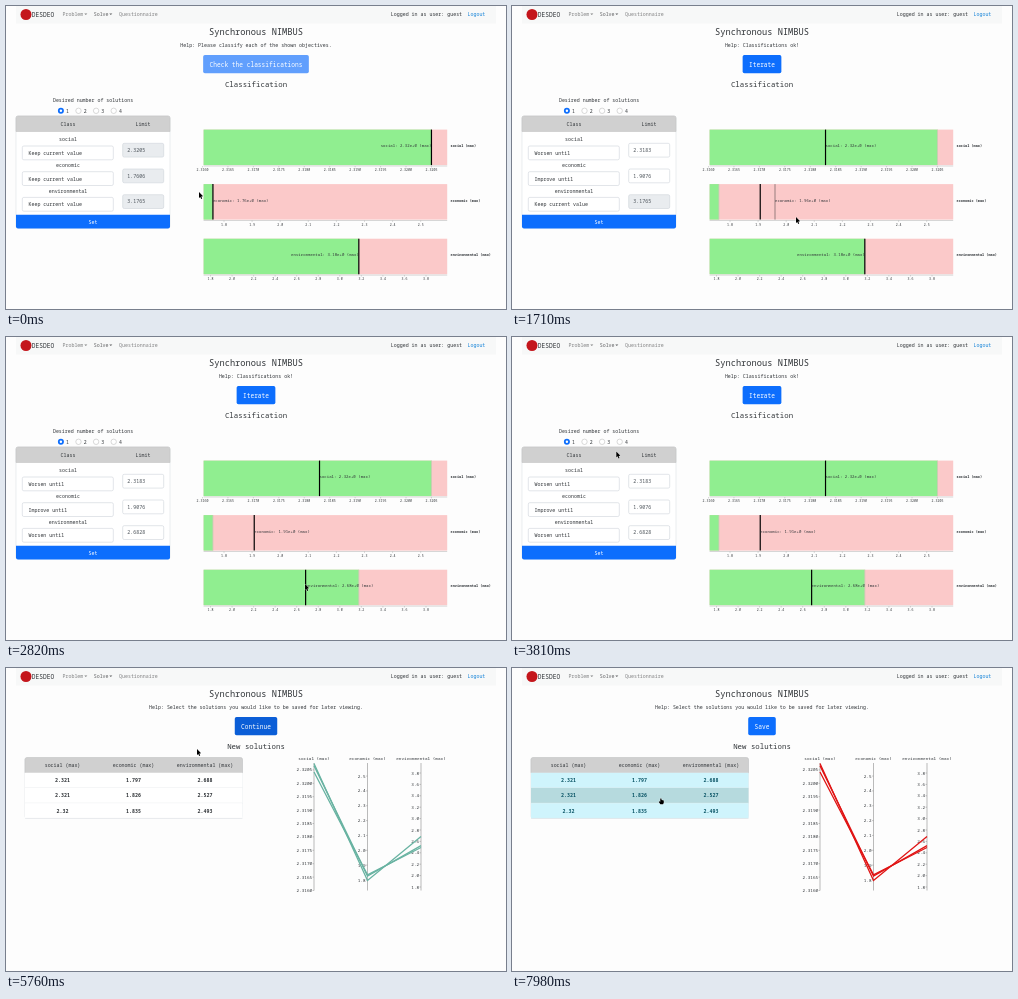
These frames come from a looping animation (500x303 px, 8 s). An HTML page with a canvas:

```html
<!DOCTYPE html>
<html lang="en">
<head>
<meta charset="utf-8">
<title>Synchronous NIMBUS</title>
<style>
  html, body { margin: 0; width: 100%; height: 100%; overflow: hidden; background: #fdfdfd; }
  canvas { display: block; width: 500px; height: 303px; }
</style>
</head>
<body>
<canvas></canvas>
<script>
const LOOP = 8000, PAGE_CHANGE = 5200, RADIO_CLICK = 4000, READY = 1400;
const BLUE = '#0d6efd', INK = '#303438', GRID = '#dee2e6';
const canvas = document.querySelector('canvas');
const ctx = canvas.getContext('2d');
const ratio = window.devicePixelRatio || 1;
canvas.width = 500 * ratio;
canvas.height = 303 * ratio;

const charts = [
  { name: 'social', top: 123.6, origin: 196.5, first: 2.316, step: 0.0005, gap: 25.44, count: 10, digits: 4,
    current: 2.3205, chosen: 2.3183, at: 780, verb: 'Worsen until' },
  { name: 'economic', top: 178.1, origin: 218, first: 1.8, step: 0.1, gap: 28.1, count: 8, digits: 1,
    current: 1.7606, chosen: 1.9076, at: READY, verb: 'Improve until' },
  { name: 'environmental', top: 232.7, origin: 204.5, first: 1.8, step: 0.2, gap: 21.55, count: 11, digits: 1,
    current: 3.1765, chosen: 2.6828, at: 2600, verb: 'Worsen until' }
];
const BAR = { left: 197.6, right: 441.2, height: 35.5 };

const axes = [
  { name: 'social', x: 308, y: 222.5, first: 2.316, step: 0.0005, gap: 13.4, count: 10, digits: 4 },
  { name: 'economic', x: 361.5, y: 212, first: 1.8, step: 0.1, gap: 14.85, count: 8, digits: 1 },
  { name: 'environmental', x: 415, y: 219, first: 1.8, step: 0.2, gap: 11.4, count: 11, digits: 1 }
];
const solutions = [
  { cells: ['2.321', '1.797', '2.688'], start: 2.32074, at: 6280 },
  { cells: ['2.321', '1.826', '2.527'], start: 2.32066, at: 7650 },
  { cells: ['2.32', '1.835', '2.493'], start: 2.32042, at: 6800 }
];

// Pointer path: time, x, y
const path = [
  [0, 193, 186], [30, 193, 186], [450, 290, 155], [700, 313, 142], [840, 313, 142],
  [1150, 265, 180], [1380, 248, 195], [1590, 248, 195], [1710, 284, 211], [2000, 296, 235],
  [2370, 299, 247], [3240, 299, 247], [3450, 240, 205], [3800, 105, 115], [4020, 90, 103],
  [4230, 90, 103], [4650, 215, 65], [4830, 235.5, 57], [5010, 238, 57], [5400, 238, 57],
  [5580, 225, 65], [5760, 191, 81], [5850, 178, 87], [6150, 140, 111], [6350, 140, 112],
  [6630, 144, 140], [6950, 145, 141], [7250, 148, 131], [8000, 149, 130]
];

const ramp = (t, from, to) => Math.min(1, Math.max(0, (t - from) / (to - from)));

function pointerAt(t) {
  const i = Math.max(1, path.findIndex(p => p[0] >= t));
  const [a, b] = [path[i - 1], path[i]];
  const k = ramp(t, a[0], b[0]);
  return { x: a[1] + (b[1] - a[1]) * k, y: a[2] + (b[2] - a[2]) * k };
}

// y is the middle of the capitals; the large font keeps letter spacing even at tiny sizes
function text(str, x, y, { size = 4.95, color = INK, align = 'left', bold = false } = {}) {
  ctx.save();
  ctx.translate(x, y + size * 0.35);
  ctx.scale(0.1, 0.1);
  ctx.font = `${bold ? 600 : 400} ${size * 10}px "Noto Sans Mono", "DejaVu Sans Mono", monospace`;
  ctx.textAlign = align;
  ctx.fillStyle = color;
  ctx.fillText(str, 0, 0);
  ctx.restore();
}
const centered = (str, x, y, options) => text(str, x, y, { align: 'center', ...options });

function rect(x, y, w, h, color) {
  ctx.fillStyle = color;
  ctx.fillRect(x, y, w, h);
}
function box(x, y, w, h, radius, fill, stroke) {
  ctx.beginPath();
  ctx.roundRect(x, y, w, h, radius);
  if (fill) { ctx.fillStyle = fill; ctx.fill(); }
  if (stroke) { ctx.strokeStyle = stroke; ctx.lineWidth = 0.6; ctx.stroke(); }
}
function circle(x, y, r, fill, stroke) {
  ctx.beginPath();
  ctx.arc(x, y, r, 0, Math.PI * 2);
  if (fill) { ctx.fillStyle = fill; ctx.fill(); }
  if (stroke) { ctx.strokeStyle = stroke; ctx.lineWidth = 0.6; ctx.stroke(); }
}
function polyline(points, color, width) {
  ctx.beginPath();
  points.forEach(([x, y]) => ctx.lineTo(x, y));
  ctx.strokeStyle = color;
  ctx.lineWidth = width;
  ctx.stroke();
}
function caret(x, y, color) {
  ctx.beginPath();
  ctx.moveTo(x - 1.5, y - 0.8);
  ctx.lineTo(x + 1.5, y - 0.8);
  ctx.lineTo(x, y + 0.8);
  ctx.fillStyle = color;
  ctx.fill();
}

function drawHeader(t) {
  rect(10, 0, 480, 17.5, '#f7f8f8');
  circle(20, 8.5, 5.5, '#c4161c');
  text('DESDEO', 25.8, 8.7, { size: 6.2 });
  text('Problem', 56.5, 8.7, { color: '#808182' });
  caret(79.8, 8.2, '#808182');
  text('Solve', 87.7, 8.7, { color: '#606163' });
  caret(104.8, 8.2, '#606163');
  text('Questionnaire', 113, 8.7, { color: '#808182' });
  text('Logged in as user: guest', 384.8, 8.7);
  text('Logout', 461.5, 8.7, { color: '#1583d8' });

  const saved = t >= solutions[0].at, ready = t >= READY, results = t >= PAGE_CHANGE;
  const help = results ? 'Select the solutions you would like to be saved for later viewing.'
    : ready ? 'Classifications ok!' : 'Please classify each of the shown objectives.';
  const label = results ? (saved ? 'Save' : 'Continue') : ready ? 'Iterate' : 'Check the classifications';
  const hover = ramp(t, 4830, 4980) - ramp(t, 5760, 5910);
  const blue = `rgb(${13 - 2 * hover}, ${110 - 16 * hover}, ${253 - 38 * hover})`;
  const width = label.length * 3.72 + 12.7;

  centered('Synchronous NIMBUS', 250, 25.5, { size: 8.7 });
  centered('Help: ' + help, 250, 39);
  box(250 - width / 2, 48.9, width, 18.3, 1.8, ready ? blue : '#619ffd');
  centered(label, 250, 58.5, { size: 6.2, color: '#fff' });
  centered(results ? 'New solutions' : 'Classification', 250, 78.5, { size: 7.4 });
}

function drawForm(t) {
  centered('Desired number of solutions', 87, 93.8);
  const selected = t >= RADIO_CLICK ? 3 : 1;
  for (let n = 1; n <= 4; n++) {
    const x = 37.3 + n * 17.6;
    if (n === selected) {
      if (n === 3) circle(x, 104.8, 4.4, '#c2dbfe');
      circle(x, 104.8, 3, BLUE);
      circle(x, 104.8, 1.2, '#fff');
    } else {
      circle(x, 104.8, 2.7, '#fff', '#bfbfbf');
    }
    centered(String(n), x + 6.7, 105);
  }

  box(10, 110, 154, 112, 2, '#fff', GRID);
  box(10, 110, 154, 15.5, [2, 2, 0, 0], '#d0d0d0', '#c4c4c4');
  centered('Class', 62, 118);
  centered('Limit', 137, 118);
  charts.forEach((chart, i) => {
    const y = i * 25.7, changed = t >= chart.at;
    centered(chart.name, 62, 133.7 + y);
    box(16.3, 140 + y, 91, 13.8, 1.5, '#fff', '#ced4da');
    text(changed ? chart.verb : 'Keep current value', 22.5, 147.2 + y);
    box(116.7, 137.3 + y, 41, 13.8, 1.5, changed ? '#fff' : '#e9ecef', '#ced4da');
    text((changed ? chart.chosen : chart.current).toFixed(4), 121.3, 144.3 + y, { color: '#495057' });
  });
  box(10, 208.8, 154, 13.7, [0, 0, 2, 2], BLUE);
  centered('Set', 87, 215.8, { color: '#fff' });
}

function drawChart(chart, t) {
  const { left, right, height } = BAR, { top } = chart, bottom = top + height;
  const axisY = bottom + 0.9;
  const toX = value => chart.origin + (value - chart.first) / chart.step * chart.gap;
  const currentX = toX(chart.current);
  rect(left, top, right - left, height, '#fbc9c9');
  rect(left, top, currentX - left, height, '#90ee90');
  polyline([[currentX, top], [currentX, bottom]], '#c9c9b4', 0.8);

  polyline([[left, axisY], [right, axisY]], '#9a9a9a', 0.4);
  for (let i = 0; i < chart.count; i++) {
    const x = chart.origin + i * chart.gap;
    polyline([[x, axisY], [x, axisY + 1.4]], '#9a9a9a', 0.4);
    centered((chart.first + i * chart.step).toFixed(chart.digits), x, bottom + 4.9, { size: 3.3 });
  }

  const value = t >= chart.at ? chart.chosen : chart.current;
  const x = toX(value);
  polyline([[x, top], [x, bottom]], '#000', 1.2);

  // The hover marker trails the pointer slightly and hides once it leaves the bar
  const p = pointerAt(Math.max(0, t - 70));
  const resting = Math.abs(p.x - x) < 1;
  const hovering = !resting && p.x > left && p.x < right && p.y > top && p.y < bottom;
  const markX = hovering ? p.x : x;
  const markValue = hovering ? chart.first + (p.x - chart.origin) / chart.gap * chart.step : value;
  if (hovering) polyline([[markX, top], [markX, bottom]], '#333', 0.5);
  text(`${chart.name}: ${markValue.toExponential(2)} (max)`, markX, top + 16.2,
    { size: 4.03, align: markX < (left + right) / 2 ? 'left' : 'right' });
  text(`${chart.name} (max)`, 444.5, top + 16.2, { size: 3.55, bold: true });
}

function drawTable(t, pointer) {
  const columns = [56.5, 127.5, 199], left = 19, width = 217.5, top = 89.6, rowHeight = 15.2;
  box(left, top, width, rowHeight * 4, 2, '#fff', GRID);
  box(left, top, width, rowHeight, [2, 2, 0, 0], '#d0d0d0', '#c4c4c4');
  charts.forEach((chart, i) => centered(`${chart.name} (max)`, columns[i], 97.4));
  solutions.forEach((solution, row) => {
    const y = top + (row + 1) * rowHeight;
    const over = pointer.x > left && pointer.x < left + width && pointer.y >= y && pointer.y < y + rowHeight;
    const selected = t >= solution.at;
    rect(left, y, width, rowHeight, selected ? (over ? '#b6dade' : '#cff4fc') : over ? '#e8e8ec' : '#fff');
    polyline([[left, y + rowHeight], [left + width, y + rowHeight]], GRID, 0.6);
    solution.cells.forEach((cell, i) =>
      centered(cell, columns[i], y + 7.7, { bold: true, color: selected ? '#0b5566' : INK }));
  });
}

function drawParallelPlot(t) {
  const toY = (axis, value) => axis.y - (value - axis.first) / axis.step * axis.gap;
  for (const axis of axes) {
    polyline([[axis.x, 95], [axis.x, 222.5]], '#777', 0.5);
    for (let i = 0; i < axis.count; i++) {
      const y = axis.y - i * axis.gap;
      polyline([[axis.x - 1.5, y], [axis.x, y]], '#777', 0.4);
      text((axis.first + i * axis.step).toFixed(axis.digits), axis.x - 1.8, y, { size: 4.35, align: 'right' });
    }
    centered(`${axis.name} (max)`, axis.x, 90, { size: 4.35 });
  }
  for (const { cells, start, at } of solutions) {
    const values = [start, +cells[1], +cells[2]];
    polyline(axes.map((axis, i) => [axis.x, toY(axis, values[i])]), t >= at ? '#e01414' : '#69b3a2', 1.3);
  }
}

function drawPointer({ x, y }, t) {
  const results = t >= PAGE_CHANGE;
  const overButton = t >= READY && Math.abs(x - 250) < 20 && y > 49 && y < 67;
  const overRadio = !results && Math.hypot(x - 90, y - 104.8) < 4;
  const overRow = results && x > 19 && x < 236 && y > 105 && y < 151;
  ctx.save();
  ctx.translate(x, y);
  ctx.fillStyle = '#000';
  ctx.strokeStyle = '#fff';
  ctx.lineWidth = 0.5;
  const outline = overButton || overRadio || overRow
    ? [[-0.7, 0.4], [0.4, 0.4], [0.7, 2], [2.8, 2.5], [2.8, 4.8], [2.1, 6.2], [-0.6, 6.2], [-2.2, 4], [-1.7, 3.3], [-0.7, 3.8]]
    : [[0, 0], [0, 6], [1.3, 4.9], [2.2, 7], [3.2, 6.5], [2.3, 4.5], [4.1, 4.3]];
  ctx.beginPath();
  outline.forEach(point => ctx.lineTo(...point));
  ctx.closePath();
  ctx.stroke();
  ctx.fill();
  ctx.restore();
}

function draw(now) {
  const t = now % LOOP, pointer = pointerAt(t);
  ctx.setTransform(ratio, 0, 0, ratio, 0, 0);
  rect(0, 0, 500, 303, '#fdfdfd');
  drawHeader(t);
  if (t < PAGE_CHANGE) {
    drawForm(t);
    charts.forEach(chart => drawChart(chart, t));
  } else {
    drawTable(t, pointer);
    drawParallelPlot(t);
  }
  drawPointer(pointer, t);
}

let begin;
function tick(now) {
  begin ??= now;
  draw(now - begin);
  requestAnimationFrame(tick);
}
requestAnimationFrame(tick);
</script>
</body>
</html>
```
